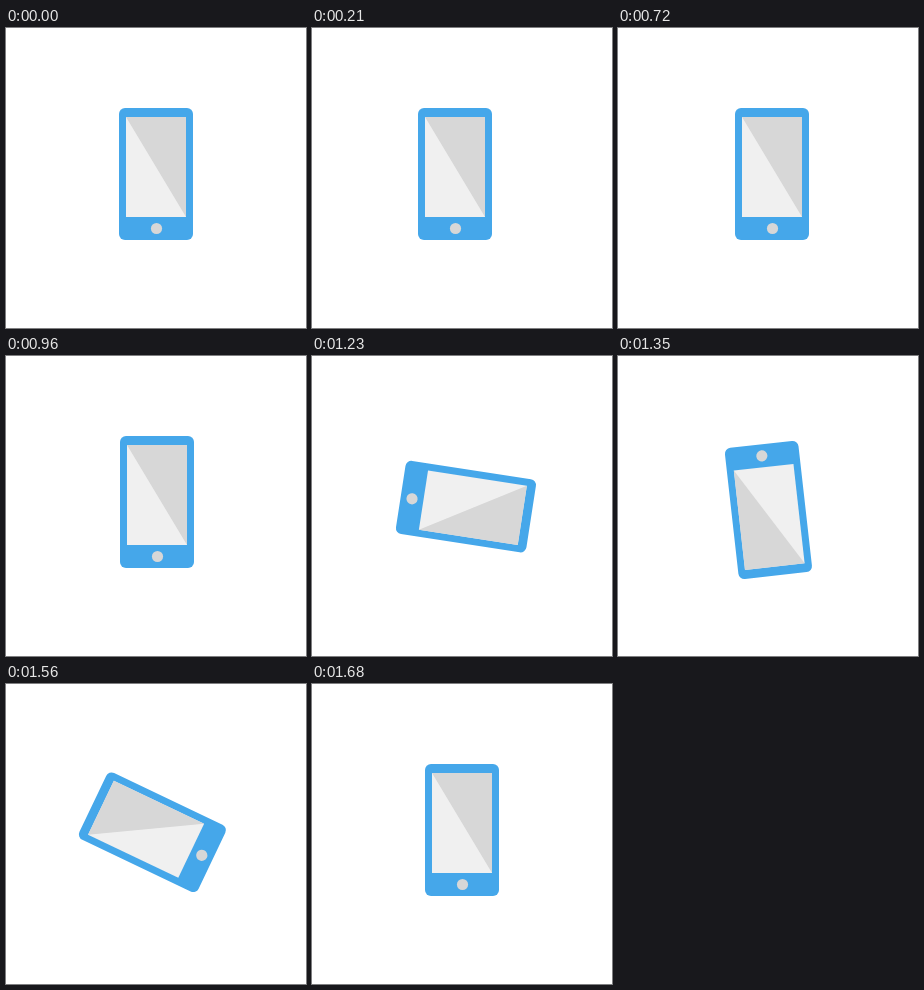
An HTML page without scripts that plays this animation: 300x300 px, repeating every 2350 ms.

```html
<!DOCTYPE html>
<html lang="en">
<head>
<meta charset="utf-8">
<title>Shaking phone</title>
<style>
  @property --shift { syntax: "<integer>"; inherits: false; initial-value: 0; }
  @property --tick { syntax: "<integer>"; inherits: false; initial-value: 0; }

  html, body { margin: 0; width: 100%; height: 100%; overflow: hidden; background: #fff; }
  svg { display: block; width: 100%; height: 100%; }

  /* Whole-pixel slide: left, right, then slowly back */
  .slide {
    transform: translateX(calc(var(--shift) * 1px));
    animation: slide 2350ms infinite;
  }
  /* One full turn in 20 ticks, slowing down slightly */
  .spin {
    transform-origin: 150px 150px;
    transform: rotate(calc(var(--tick) * (20.34 - 0.117 * var(--tick)) * 1deg));
    animation: spin 2350ms infinite;
  }

  @keyframes slide {
    0% { --shift: 0; animation-timing-function: steps(7); }
    8.93% { --shift: -7; animation-timing-function: steps(9); }
    20.42% { --shift: 7; animation-timing-function: steps(20); }
    45.95%, 100% { --shift: 0; }
  }
  @keyframes spin {
    0%, 45.95% { --tick: 0; animation-timing-function: steps(20); }
    71.48%, 100% { --tick: 20; }
  }
</style>
</head>
<body>
<svg viewBox="0 0 300 300">
  <g class="slide">
    <g class="spin">
      <rect x="113" y="80" width="74" height="132" rx="6" fill="#45a7ea"/>
      <rect x="120" y="89" width="60" height="100" fill="#f0f0f0"/>
      <path d="M120 89h60v100z" fill="#d7d7d7"/>
      <circle cx="150.5" cy="200.5" r="5.6" fill="#d7d7d7"/>
    </g>
  </g>
</svg>
</body>
</html>
```
